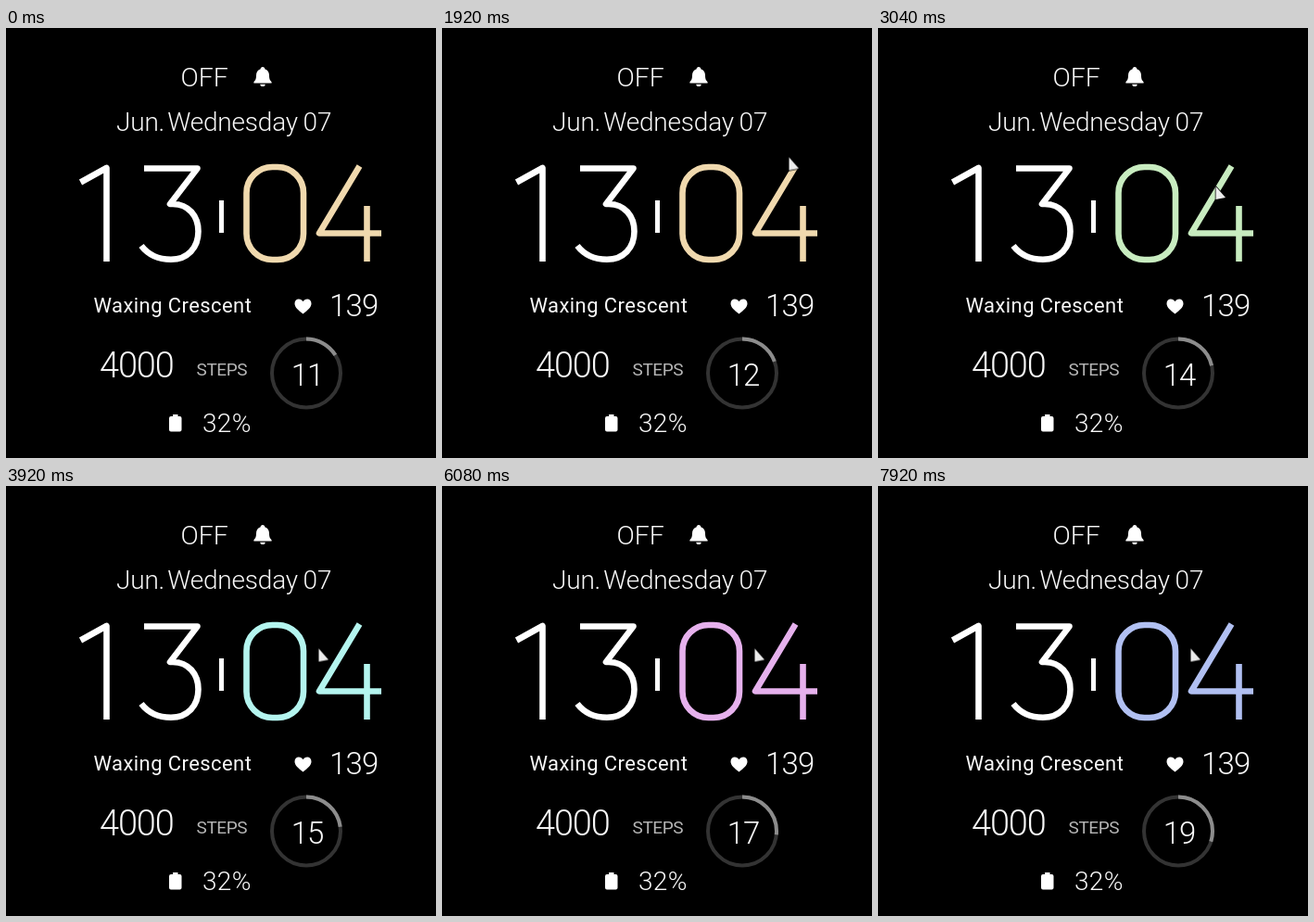
An HTML page that plays this animation: 464 by 464 pixels, repeating every 8 s.

```html
<!DOCTYPE html>
<html lang="en">
<head>
<meta charset="utf-8">
<title>Watch face</title>
<style>
  html, body { margin: 0; width: 100%; height: 100%; overflow: hidden; background: #000; }
  svg { display: block; width: 100vw; height: 100vh; }
  text { font-family: Roboto, "Open Sans", sans-serif; font-weight: 300; fill: #f8f8f8; }
  .mid { text-anchor: middle; }
  .book { font-weight: 400; }
  .line { fill: none; stroke: #fff; stroke-width: 6.6; stroke-linejoin: round; }
  .icon { fill: #fff; }

  .minutes { animation: tint 8s step-end infinite; }
  .arc { animation: sweep 8s linear infinite; }
  .cursor { animation: move 8s linear infinite, show 8s step-end infinite; }

  @keyframes tint {
    0%  { stroke: #f0d9ae; }
    36% { stroke: #c8ecc0; }
    47% { stroke: #b4f5ef; }
    62% { stroke: #989898; }
    76% { stroke: #e6b1ed; }
    89% { stroke: #b1c0f2; }
  }
  @keyframes sweep {
    from { stroke-dasharray: 58 360; }
    to   { stroke-dasharray: 108 360; }
  }
  @keyframes move {
    0%, 10%   { transform: translate(391px, -4px); }
    12%       { transform: translate(382px, 50px); }
    14%       { transform: translate(388px, -14px); }
    21%       { transform: translate(383px, 101px); }
    26%       { transform: translate(368px, 165px); }
    30%, 32%  { transform: translate(366px, 172px); }
    34%, 43%  { transform: translate(364px, 171px); }
    45%, 100% { transform: translate(337px, 175.5px); }
  }
  @keyframes show {
    0%  { visibility: hidden; }
    10% { visibility: visible; }
    14% { visibility: hidden; }
    21% { visibility: visible; }
  }
</style>
</head>
<body>
<svg viewBox="0 0 464 464">
  <text x="188.500" y="62.500" font-size="28.500">OFF</text>
  <g class="icon">
    <path d="M277 42c1.500 0 2.300 1 2.300 2.200c3 1 4.700 3.600 4.700 6.800c0 4 .8 5.300 2.600 7.200v1.300h-19.200v-1.300c1.800-1.900 2.600-3.200 2.600-7.200c0-3.200 1.700-5.800 4.700-6.800c0-1.200.8-2.200 2.300-2.200z"/>
    <path d="M274.300 60.800h5.400a2.700 2.300 0 0 1-5.400 0z"/>
  </g>

  <text x="119" y="111" font-size="28" letter-spacing="-.2" word-spacing="-3.500">Jun. Wednesday</text>
  <text x="320.500" y="111" font-size="28">07</text>

  <g class="line" role="img" aria-label="13">
    <path d="M80.500 166.500L108.500 151V252"/>
    <path d="M149 151.500H206.500L177 190H180C197 190 207.500 203 207.500 219.500C207.500 237 196 249.800 178 249.800C164 249.800 153 244 146 235"/>
  </g>
  <rect class="icon" x="230" y="186" width="5" height="35"/>
  <g class="line minutes" role="img" aria-label="04">
    <rect x="259.500" y="150" width="61.500" height="100" rx="28"/>
    <path d="M381.500 149L338 221.500H405M389.500 192V252"/>
  </g>

  <text class="book" x="94.500" y="307" font-size="22" letter-spacing=".42">Waxing Crescent</text>
  <path class="icon" d="M320.500 308.500C315.500 304.500 311.500 301.500 311.500 297.200C311.500 294.500 313.500 292.600 315.900 292.600C317.800 292.600 319.500 293.500 320.500 295.200C321.500 293.500 323.200 292.600 325.100 292.600C327.500 292.600 329.500 294.500 329.500 297.200C329.500 301.500 325.500 304.500 320.500 308.500z"/>
  <text x="349" y="311" font-size="33" letter-spacing="-.8">139</text>

  <text x="101" y="376.500" font-size="38" letter-spacing="-1.200">4000</text>
  <text class="book" x="205.500" y="375" font-size="19" letter-spacing="-.4" style="fill:#b4b4b4">STEPS</text>

  <g fill="none" stroke-width="4">
    <circle cx="324" cy="372.500" r="37" stroke="#333"/>
    <circle class="arc" cx="324" cy="372.500" r="37" stroke="#8c8c8c" pathLength="360" transform="rotate(-90 324 372.500)"/>
  </g>
  <text id="sec" class="mid" x="325" y="385.500" font-size="33" letter-spacing="-1">11</text>

  <path class="icon" d="M180 417h5.500v2h2a2 2 0 0 1 2 2v12.500a2 2 0 0 1-2 2h-9.500a2 2 0 0 1-2-2v-12.500a2 2 0 0 1 2-2h2z"/>
  <text x="212" y="436" font-size="28" letter-spacing=".3">32%</text>

  <path class="cursor" d="M.5 0V14L11 12z" fill="#ececec" stroke="#000" stroke-width="1.500" paint-order="stroke"/>
</svg>
<script>
  const LOOP = 8000, TICK = 960, FIRST = 11;
  const sec = document.getElementById('sec');
  const clock = document.querySelector('.arc').getAnimations()[0];

  function draw(now) {
    const t = (clock ? clock.currentTime || 0 : now) % LOOP;
    const label = String(FIRST + Math.floor(t / TICK));
    if (sec.textContent !== label) sec.textContent = label;
    requestAnimationFrame(draw);
  }
  requestAnimationFrame(draw);
</script>
</body>
</html>
```
